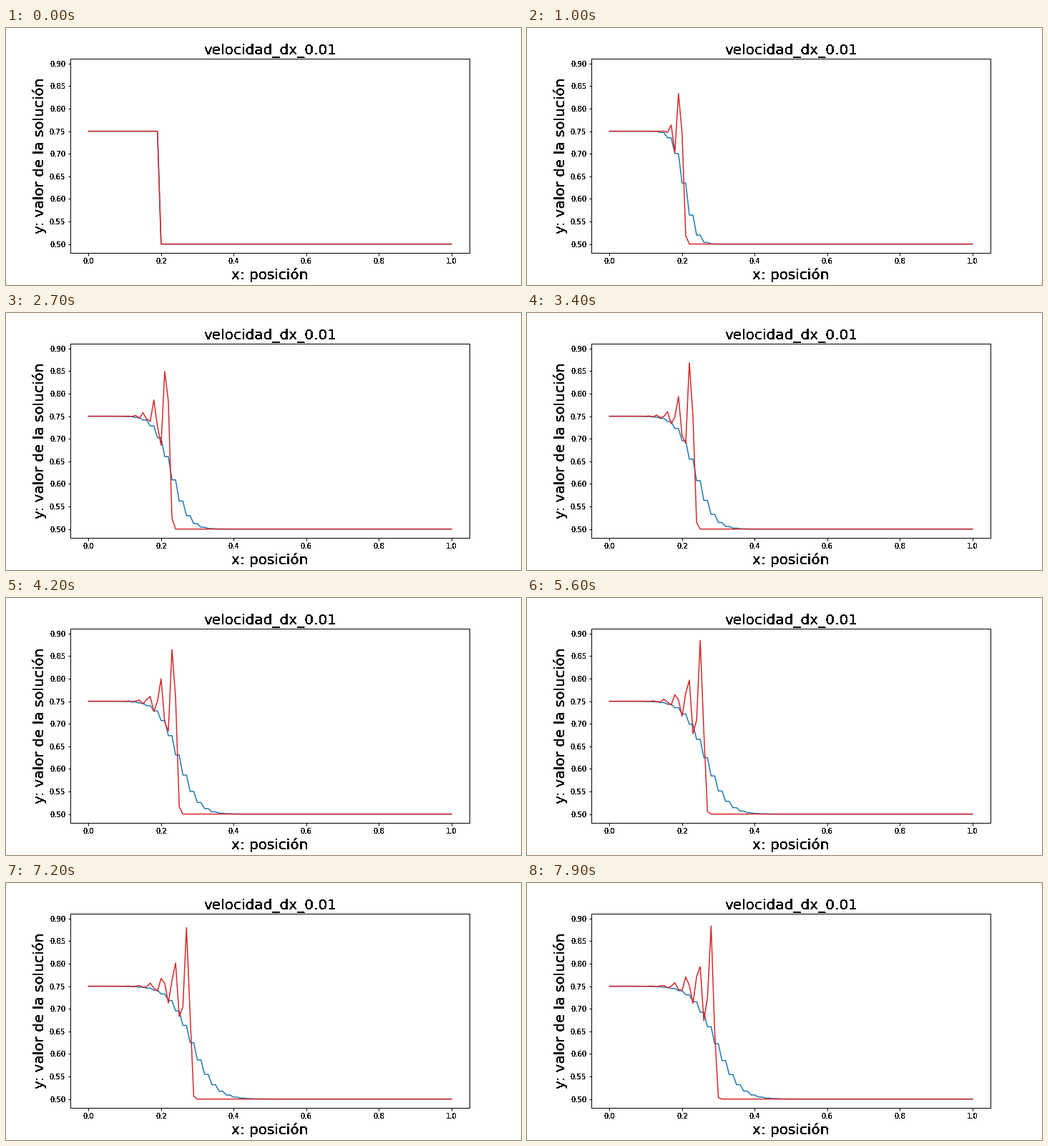
A matplotlib script for the animation above (8 s loop, 720 by 360 pixels).

```python
import numpy as np
import matplotlib.pyplot as plt
from matplotlib.animation import FuncAnimation

plt.rcParams.update({
    "font.family": "DejaVu Sans",
    "font.size": 10,
    "axes.linewidth": 1,
    "figure.subplot.bottom": 0.125,
})

FRAMES = 80
DX, DT = 0.01, 0.005
R = DT / DX


def flux(rho):
    """Traffic flow with unit top speed."""
    return rho * (1 - rho)


def lax_friedrichs(rho):
    new = rho.copy()
    f = flux(rho)
    new[1:-1] = (rho[2:] + rho[:-2]) / 2 - R / 2 * (f[2:] - f[:-2])
    return new


def lax_wendroff(rho):
    new = rho.copy()
    half = (rho[1:] + rho[:-1]) / 2 - R / 2 * np.diff(flux(rho))
    new[1:-1] -= R * np.diff(flux(half))
    return new


def speeds(step, rho):
    rows = [rho]
    for _ in range(FRAMES - 1):
        rows.append(step(rows[-1]))
    return 1 - np.array(rows)


def hard_edges(img, dpi):
    """Make every touched pixel of a text opaque."""
    out = img.copy()
    out[..., 3] = img[..., 3] > 0.25
    return out, 0, 0


x = np.arange(101) * DX
start = np.where(np.arange(101) < 20, 0.25, 0.5)
runs = [speeds(lax_friedrichs, start), speeds(lax_wendroff, start)]

fig, ax = plt.subplots(figsize=(10, 5), dpi=72)
lines = [ax.plot(x, run[0], color=color, lw=1.5)[0]
         for run, color in zip(runs, ("tab:blue", "tab:red"))]

low, high = min(r.min() for r in runs), max(r.max() for r in runs)
pad = 0.05 * (high - low)
ax.set_xlim(-0.05, 1.05)
ax.set_ylim(low - pad, high + pad)
ax.set_xticks(np.arange(0, 1.01, 0.2))
ax.set_yticks(np.arange(0.5, 0.91, 0.05))
ax.tick_params(width=1)

texts = [
    ax.set_title("velocidad_dx_0.01", fontsize=20),
    ax.set_xlabel("x: posición", fontsize=20),
    ax.set_ylabel("y: valor de la solución", fontsize=20),
]
for text in texts + ax.get_xticklabels() + ax.get_yticklabels():
    text.set_agg_filter(hard_edges)


def update(n):
    for line, run in zip(lines, runs):
        line.set_ydata(run[n])
    return lines


anim = FuncAnimation(fig, update, frames=FRAMES, interval=100,
                     repeat=True, repeat_delay=0)
plt.show()
```
